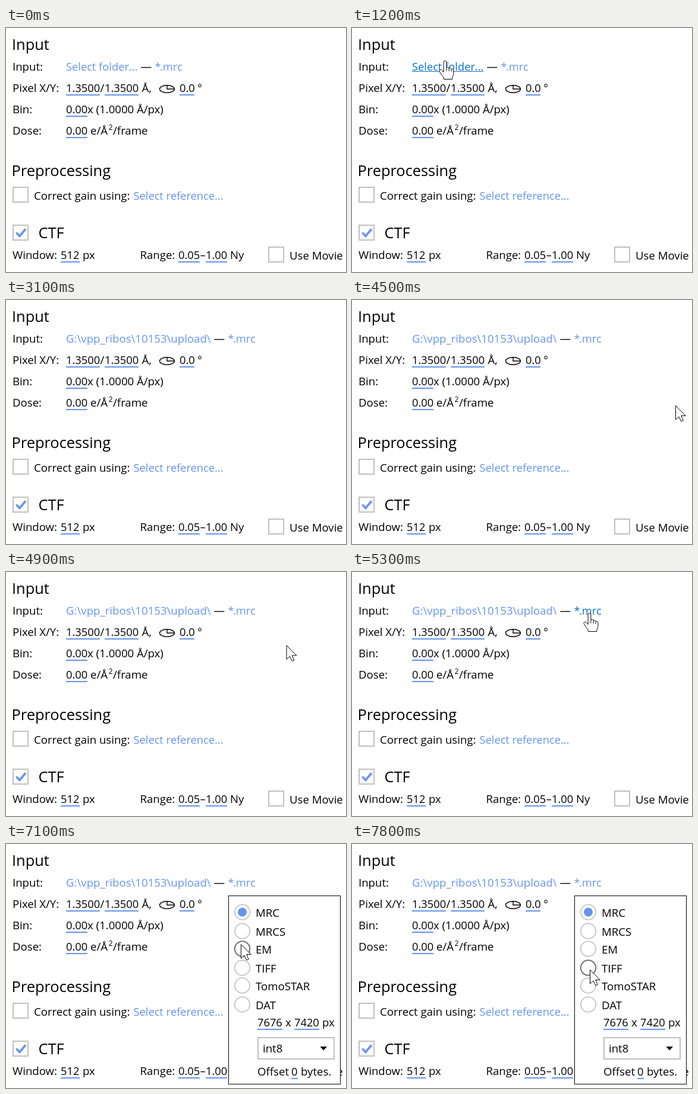
Animation of 572x412 px, one loop 8000 ms. Source, as an HTML page:

```html
<!DOCTYPE html>
<html lang="en">
<head>
<meta charset="utf-8">
<title>Import settings</title>
<style>
  html, body { margin: 0; width: 100%; height: 100%; overflow: hidden; background: #fff; }
  svg { display: block; width: 100vw; height: 100vh; }
  text { font: 18.6px "Open Sans", "Noto Sans", sans-serif; fill: #000; white-space: pre; }
  .head { font-size: 25.4px; }
  .num, .link, .hover { font-size: 18.3px; }
  .sup { font-size: 12.5px; }
  .link, .path { fill: #6495ed; }
  .hover { fill: #0a70cc; }
  .rule { fill: #6495ed; }
  .box { fill: #fff; stroke: #c0c0c0; stroke-width: 2; }
  .radio { fill: #fff; stroke: #bdbdbd; stroke-width: 1.6; }
  .radio.over { stroke: #707070; stroke-width: 2; }
  .ink { fill: none; stroke: #000; stroke-width: 1.4; }
  .cursor { fill: #fff; stroke: #000; stroke-width: 1; stroke-linejoin: round; }
</style>
</head>
<body>
<svg id="stage" viewBox="0 0 572 412"></svg>
<script>
const NS = "http://www.w3.org/2000/svg";
const LOOP = 8000, STEP = 100;
const stage = document.getElementById("stage");

function add(parent, tag, attrs, content) {
  const el = document.createElementNS(NS, tag);
  for (const key in attrs) el.setAttribute(key, attrs[key]);
  if (content) el.textContent = content;
  parent.appendChild(el);
  return el;
}
const group = parent => add(parent, "g", {});
const label = (parent, x, y, str, cls = "") => add(parent, "text", { x, y, class: cls }, str);
const box = (parent, x, y, width = 25, height = 25) =>
  add(parent, "rect", { x, y, width, height, class: "box" });
const show = (el, on) => el.setAttribute("visibility", on ? "visible" : "hidden");

// Editable number with a blue rule below it
function field(parent, x, y, str, width) {
  label(parent, x, y, str, "num");
  add(parent, "rect", { x, y: y + 4, width, height: 2, class: "rule" });
}

// Input section
const form = group(stage);
label(form, 10, 37, "Input", "head");
label(form, 11, 72, "Input:");
const folder = label(form, 101, 72, "Select folder...", "link");
const folderRule = add(form, "rect", { x: 101, y: 73, width: 120, height: 1, class: "hover" });
const path = label(form, 101, 72, "G:\\vpp_ribos\\10153\\upload\\", "path");
const suffix = group(form);
label(suffix, 226.5, 72, "—");
const format = group(suffix);
label(format, 250.5, 72, "*", "link");
label(format, 259, 72, ".mrc", "link");

label(form, 11, 108, "Pixel X/Y:");
field(form, 101, 108, "1.3500", 57);
label(form, 158.5, 108, "/");
field(form, 166, 108, "1.3500", 57);
label(form, 228.5, 108, "Å,");
add(form, "ellipse", { cx: 271, cy: 103, rx: 12.5, ry: 6.3, class: "ink" });
add(form, "path", { d: "M271 96.7V103H283.5", class: "ink" });
field(form, 292, 108, "0.0", 25);
label(form, 322, 108, "°");

label(form, 11, 144, "Bin:");
field(form, 101, 144, "0.00", 36);
label(form, 137, 144, "x (1.0000 Å/px)");

label(form, 11, 180, "Dose:");
field(form, 101, 180, "0.00", 36);
label(form, 142, 180, "e/Å");
label(form, 172.5, 171.5, "2", "sup");
label(form, 180, 180, "/frame");

// Preprocessing section
label(form, 9.5, 250, "Preprocessing", "head");
box(form, 12, 269);
label(form, 47, 290, "Correct gain using:");
label(form, 214.5, 290, "Select reference...", "link");

// CTF section
box(form, 12, 333);
add(form, "path", { d: "M17.5 345.5L22.8 351.5L33 339.5", fill: "none", stroke: "#6495ed", "stroke-width": 3.7 });
label(form, 54.5, 355, "CTF", "head");
label(form, 11, 390, "Window:");
field(form, 92, 390, "512", 32);
label(form, 129, 390, "px");
label(form, 225.5, 390, "Range:");
field(form, 290, 390, "0.05", 36);
label(form, 326.5, 390, "–");
field(form, 336, 390, "1.00", 36);
label(form, 377, 390, "Ny");
box(form, 442, 370);
label(form, 477, 391, "Use Movie");

// Format popup
const popup = group(stage);
add(popup, "rect", { x: 374.5, y: 87.5, width: 188, height: 318, fill: "#fff", stroke: "#000" });
const radios = [["MRC", 115], ["MRCS", 147], ["EM", 177], ["TIFF", 209], ["TomoSTAR", 239], ["DAT", 271]]
  .map(([name, y]) => {
    label(popup, 420, y + 8, name);
    return { y, el: add(popup, "circle", { cx: 397.5, cy: y, r: 12.7, class: "radio" }) };
  });
add(popup, "circle", { cx: 397.5, cy: 115, r: 7.5, class: "rule" });
field(popup, 423, 308, "7676", 42);
label(popup, 470, 308, "x");
field(popup, 485, 308, "7420", 42);
label(popup, 532, 308, "px");
box(popup, 424, 327, 128, 36);
label(popup, 432, 352, "int8");
add(popup, "path", { d: "M528.5 342H540L534.2 348.5Z" });
label(popup, 423, 391, "Offset");
field(popup, 480, 391, "0", 11);
label(popup, 496, 391, "bytes.");

// Pointers, both with the hot spot at 0,0
const pointer = group(stage);
const arrow = add(pointer, "path", { class: "cursor",
  d: "M0 0V23.5L5.4 18.5L9.3 26.5L12.8 25L9.2 17H16.8Z" });
const hand = add(pointer, "path", { class: "cursor",
  d: "M-2.4 2.4a2.4 2.4 0 0 1 4.8 0V11c1.5-1 4-.6 4.3 1.4c1.7-.8 3.7-.2 4 1.6c1.8-.6 3.6.4 3.6 2.4V22" +
     "c0 3.4-2 4.6-2.2 7.5V31H-2V29.5c-.6-3-5.4-7-7.2-11.5c-1-3 2-4.4 4-2.2l2.8 3.2Z" +
     "M2.4 11V17M6.7 12.4V17.5M10.7 14V18" });

// from, to (ms), start x, y, end x, y
const MOVES = [
  [700, 1200, 555, 321, 156.5, 55.5],
  [2200, 2400, 156.5, 55.5, 426, 304],
  [4500, 5300, 544.5, 178.5, 399.5, 69.5],
  [6600, 7400, 399.5, 69.5, 393.5, 216],
  [7600, 7800, 393.5, 216, 400.5, 212.5]
];
const smooth = u => u * u * (3 - 2 * u);

function pointerAt(t) {
  if (t < 700 || (t >= 2500 && t < 4500)) return null;
  const [from, to, x0, y0, x1, y1] = MOVES.filter(m => m[0] <= t).pop();
  const k = smooth(Math.min(1, (t - from) / (to - from)));
  return { x: x0 + (x1 - x0) * k, y: y0 + (y1 - y0) * k };
}

function draw(ms) {
  const t = Math.floor((ms % LOOP) / STEP) * STEP;
  const chosen = t >= 3100, open = t >= 6100;
  const p = pointerAt(t);
  const shift = chosen ? 123 : 0;
  const within = (x0, x1, y0, y1) => !!p && p.x >= x0 && p.x <= x1 && p.y >= y0 && p.y <= y1;
  const onFolder = !chosen && within(101, 221, 55, 80);
  const onFormat = within(251 + shift, 297 + shift, 55, 80);

  show(folder, !chosen);
  show(path, chosen);
  folder.setAttribute("class", onFolder ? "hover" : "link");
  show(folderRule, onFolder);
  suffix.setAttribute("transform", `translate(${shift} 0)`);
  for (const part of format.children) part.setAttribute("class", onFormat && !open ? "hover" : "link");

  show(popup, open);
  for (const { y, el } of radios)
    el.classList.toggle("over", open && within(384, 520, y - 13, y + 13));

  const pointing = onFolder || onFormat;
  show(arrow, p && !pointing);
  show(hand, p && pointing);
  if (p) pointer.setAttribute("transform", `translate(${p.x.toFixed(1)} ${p.y.toFixed(1)})`);
}

const start = performance.now();
function tick() {
  draw(performance.now() - start);
  requestAnimationFrame(tick);
}
tick();
</script>
</body>
</html>
```
